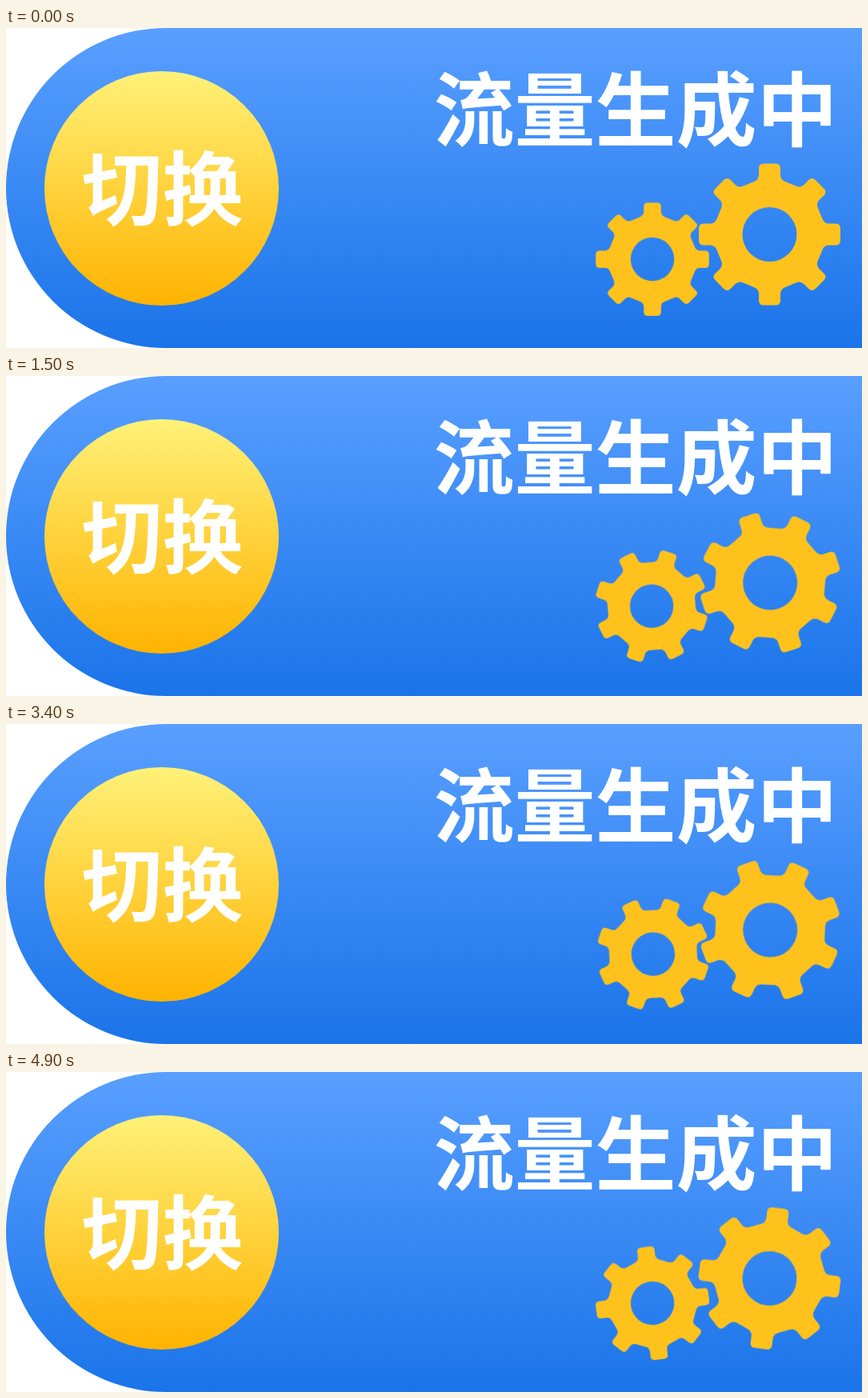
Write an HTML page that moves like this. It is 1070x400 px and loops after 5 s.

```html
<!DOCTYPE html>
<html lang="zh-CN">
<head>
<meta charset="utf-8">
<title>流量生成中</title>
<style>
  html, body { margin: 0; width: 100%; height: 100%; overflow: hidden; background: #fff; }
  svg { display: block; width: 1070px; height: 400px; }
  text { font: 700 101px "Noto Sans CJK SC", "Noto Sans CJK", sans-serif; fill: #fff; }
  .gear { fill: #ffc21c; fill-rule: evenodd; }
  .spin { animation: turn 5s steps(50) infinite; }
  .back { animation-direction: normal; animation-name: turn-back; }
  @keyframes turn { to { transform: rotate(360deg); } }
  @keyframes turn-back { to { transform: rotate(-360deg); } }
</style>
</head>
<body>
<svg viewBox="0 0 1070 400">
  <defs>
    <linearGradient id="blue" x2="0" y2="1">
      <stop stop-color="#599fff"/>
      <stop offset="1" stop-color="#1a74e9"/>
    </linearGradient>
    <linearGradient id="gold" x2="0" y2="1">
      <stop stop-color="#fff178"/>
      <stop offset="1" stop-color="#ffb300"/>
    </linearGradient>
    <path id="gear"/>
  </defs>
  <path d="M1070 0H200A200 200 0 0 0 200 400H1070Z" fill="url(#blue)"/>
  <circle cx="194.5" cy="200.5" r="146.5" fill="url(#gold)"/>
  <text x="94.5" y="238.5">切换</text>
  <text x="534.5" y="139.5">流量生成中</text>
  <!-- Each gear sits slightly off its pivot, so it wobbles as it turns. -->
  <g class="gear">
    <g transform="translate(808 288)"><g class="spin">
      <use href="#gear" transform="translate(0 1) scale(.8)"/>
    </g></g>
    <g transform="translate(955 258)"><g class="spin back">
      <use href="#gear" transform="translate(-.5 0)"/>
    </g></g>
  </g>
</svg>
<script>
  const TEETH = 8, TIP = 88.5, ROOT = 68.5, HALF = 13.5, HOLE = 34, ROUND = 6;

  function rotate([x, y], a) {
    const c = Math.cos(a), s = Math.sin(a);
    return [x * c - y * s, x * s + y * c];
  }

  // Point at distance d from p on the way to q.
  function toward(p, q, d) {
    const k = d / Math.hypot(q[0] - p[0], q[1] - p[1]);
    return p.map((v, i) => v + (q[i] - v) * k);
  }

  function roundedPolygon(points) {
    return points.map((p, i) => {
      const prev = points.at(i - 1), next = points[(i + 1) % points.length];
      return `${i ? 'L' : 'M'}${toward(p, prev, ROUND)}Q${p} ${toward(p, next, ROUND)}`;
    }).join('') + 'Z';
  }

  const tooth = [[-HALF, -ROOT], [-HALF, -TIP], [HALF, -TIP], [HALF, -ROOT]];
  const outline = Array.from({ length: TEETH }, (_, i) =>
    tooth.map(p => rotate(p, i * 2 * Math.PI / TEETH))).flat();
  const hole = `M${HOLE} 0A${HOLE} ${HOLE} 0 1 1 ${-HOLE} 0A${HOLE} ${HOLE} 0 1 1 ${HOLE} 0Z`;
  document.getElementById('gear').setAttribute('d', roundedPolygon(outline) + hole);
</script>
</body>
</html>
```
